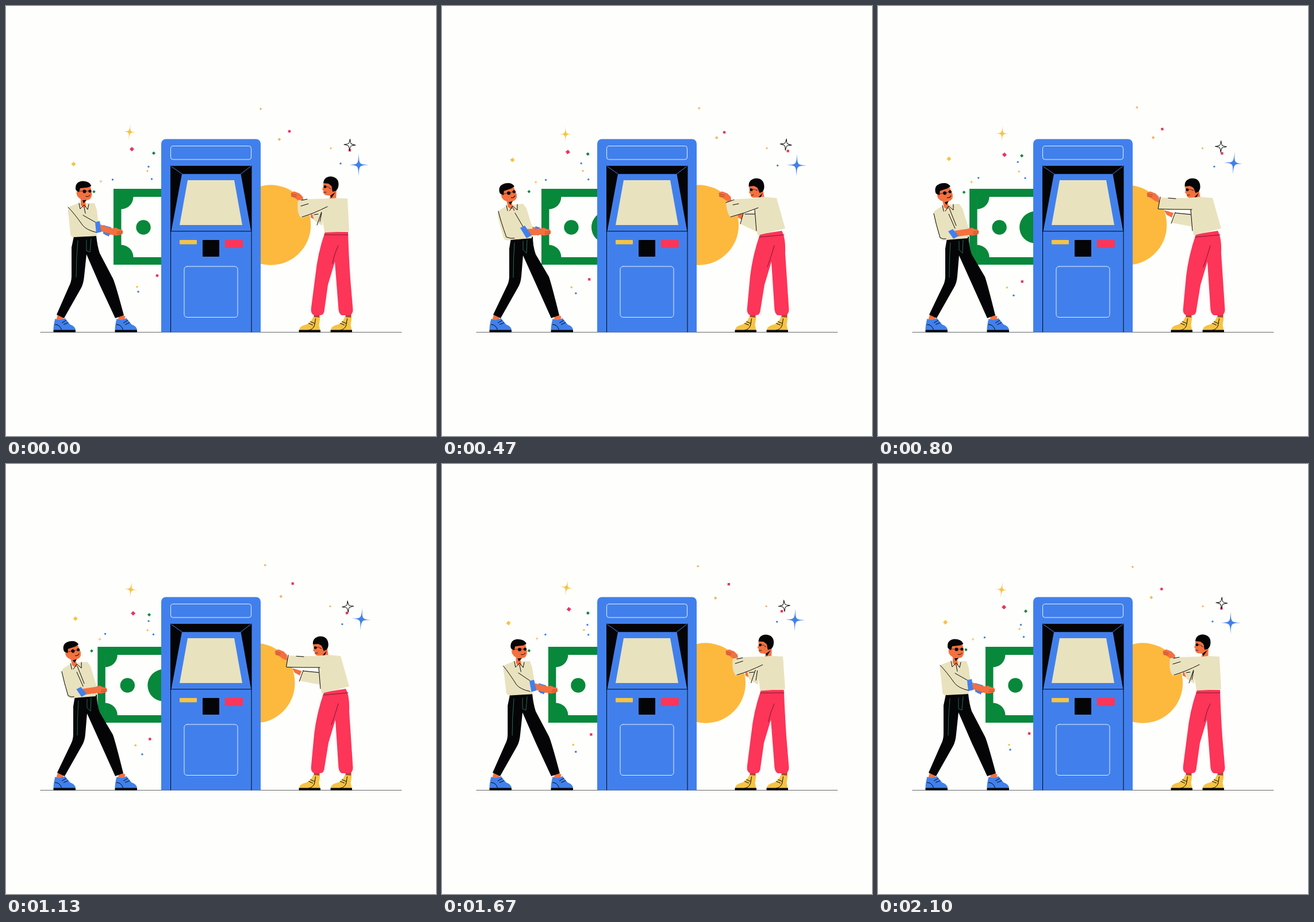
These frames come from a looping animation (748 px wide and 748 px high, 2130 ms). An HTML page with a canvas:

```html
<!DOCTYPE html>
<html lang="en">
<head>
<meta charset="utf-8">
<title>Cash machine exchange</title>
<style>
html, body { margin: 0; width: 100%; height: 100%; overflow: hidden; background: #fefefc; }
canvas { display: block; }
</style>
</head>
<body>
<canvas id="stage" width="748" height="748"></canvas>
<script>
const ctx = document.getElementById('stage').getContext('2d');
const LOOP = 2130, TAU = Math.PI * 2;
const BLUE = '#4180ec', GREEN = '#07883a', GOLD = '#fdb93e', CREAM = '#e9e2be', SKIN = '#f4703f',
      RED = '#fd3558', PINK = '#e8365f', INK = '#050507', YELLOW = '#f6c344', PAPER = '#fefefc';

const fill = (color, d) => { ctx.fillStyle = color; ctx.fill(new Path2D(d)); };
const line = (d, color = INK, w = 1) => {
  ctx.strokeStyle = color; ctx.lineWidth = w; ctx.stroke(new Path2D(d));
};
const disc = (color, x, y, r) => {
  ctx.fillStyle = color; ctx.beginPath(); ctx.arc(x, y, r, 0, TAU); ctx.fill();
};
const box = (color, x, y, w, h, r = 0) => {
  ctx.fillStyle = color; ctx.beginPath(); ctx.roundRect(x, y, w, h, r); ctx.fill();
};
const frame = (x, y, w, h, r) => {
  ctx.strokeStyle = '#e6efff'; ctx.lineWidth = 1;
  ctx.beginPath(); ctx.roundRect(x, y, w, h, r); ctx.stroke();
};
const at = (x, y, deg, draw) => {
  ctx.save(); ctx.translate(x, y); ctx.rotate(deg * Math.PI / 180); draw(); ctx.restore();
};

// 0 -> 1 between a and b, hold, then 1 -> 0 between c and d
const ease = (t, a, b) => (1 - Math.cos(Math.PI * Math.min(1, Math.max(0, (t - a) / (b - a))))) / 2;
const swing = (t, a, b, c, d) => ease(t, a, b) - ease(t, c, d);

// Blend between evenly spaced path poses that share one structure
function pose(k, ...poses) {
  const s = k * (poses.length - 1), i = Math.min(poses.length - 2, Math.floor(s)), f = s - i;
  const next = poses[i + 1].match(/-?[\d.]+/g);
  let n = 0;
  return poses[i].replace(/-?[\d.]+/g, v => +v + (next[n++] - v) * f);
}

// Floating bits: colour, radius, centre x y, cosine sway x y, sine sway x y
const dots = [
  [BLUE, 1.7, 247.5, 276, .5, 3.5, -5.5, -3],
  [BLUE, 1.7, 255, 299, -1.5, 2, 0, 2.5],
  [BLUE, 1.7, 179, 299, 6.5, 3, .5, 3],
  [BLUE, 1.8, 233.5, 501, -3.5, -4, 0, -.5],
  [BLUE, 1.7, 583.5, 276.5, -1.5, -2.5, .5, 1.5],
  [YELLOW, 1.8, 226.5, 489, 1.5, -.5, -1.5, .5]
];
const diamonds = [
  [PINK, 4, 220, 254.5, -1, -5.5, -1, .5],
  [GREEN, 3, 253, 259, 4, -3, 0, -1],
  [GREEN, 2.8, 151, 324, 2, -1, 0, -1],
  [YELLOW, 4, 119.5, 271.5, -2, 3.5, 3.5, -4.5],
  ['#f3b562', 2, 246, 288, 0, -1, -1, -1],
  ['#f3b562', 2.2, 447, 177.5, -4, 1.5, 1, 0],
  ['#f3b562', 2.8, 477, 231, -1.5, 1, 1, -2],
  ['#f3b562', 2, 564.5, 247.5, .5, 0, .5, 0]
];
const squares = [
  [PINK, 3, 256.5, 474, 6.5, -5, -1.5, 2.5],
  [PINK, 3, 495.5, 213.5, -2.5, 4.5, -4, 5.5],
  [PINK, 3, 596, 255, 2, -4, 5.5, -2]
];
const goldStars = [
  [YELLOW, 12, 216, 219, -1, 0, -1, 4],
  ['#f3b562', 4.5, 164, 305, 1, 0, -1, 1.5]
];
const blueStar = [BLUE, 17, 616, 273.5, -2.5, 3, 1.5, 3];
const spark = [PAPER, 10, 596.5, 244.5, 1.5, -3, 1.5, -3];

function floating(t) {
  const a = t / LOOP * TAU, c = Math.cos(a), s = Math.sin(a);
  const put = ([color, r, x, y, cx, cy, sx, sy], deg, draw) =>
    at(x + cx * c + sx * s, y + cy * c + sy * s, deg, () => draw(color, r));
  const square = (color, r) => box(color, -r * .71, -r * .71, r * 1.42, r * 1.42);
  const starPath = (r, h, k = r * .05) =>
    `M0,${-h}C${k},${-k} ${k},${-k} ${r},0C${k},${k} ${k},${k} 0,${h}` +
    `C${-k},${k} ${-k},${k} ${-r},0C${-k},${-k} ${-k},${-k} 0,${-h}Z`;
  const star = (color, r) => fill(color, starPath(r, r * 1.17));
  dots.forEach(b => put(b, 0, (color, r) => disc(color, 0, 0, r)));
  diamonds.forEach(b => put(b, 45 + 8 * s, square));
  squares.forEach(b => put(b, 10 * c, square));
  goldStars.forEach(b => put(b, 6 - 6 * s, star));
  put(blueStar, 3 - 3 * c, star);
  put(spark, 3 * c + 5 * s, (color, r) => {
    fill(color, starPath(r, r, 1.2));
    line(starPath(r, r, 1.2), INK, 1);
  });
}

function bill(x) {
  at(x, 318, 0, () => {
    box(GREEN, 0, 0, 180, 132);
    box(PAPER, 13.5, 14, 150, 105);
    fill(GREEN, 'M13,14H34.5A21.5,21.5 0 0 1 13,35.5ZM13,119H34.5A21.5,21.5 0 0 0 13,97.5Z');
    disc(GREEN, 52, 67, 12.7);
    disc(GREEN, 115, 67, 28);
  });
}

function machine() {
  box(BLUE, 270, 231.5, 173, 336, [8, 8, 0, 0]);
  frame(286.5, 243.5, 140, 23.5, 4);
  fill(INK, 'M286,278H427V391H286Z');
  fill(BLUE, 'M306,292.3H408.5L426.3,391.5H287.5Z');
  line('M286,278L306,292M427,278L408.5,292', BLUE);
  fill(CREAM, 'M316,303H397L411,381H302Z');
  line('M286.5,278V567M427,278V567M286,391.8H427');
  box(YELLOW, 302, 407, 30, 7.5, 1);
  box(INK, 342, 407, 29, 29, 1);
  box(RED, 381, 407, 31, 14, 1);
  frame(310, 453, 93, 88.5, 5);
}

function shoe(x) {
  at(x, 0, 0, () => {
    fill(SKIN, 'M8,535L18,540L16,549L5,546Z');
    fill(BLUE, 'M3,544Q11,549 20,543L29,554Q38,557 38.5,564H0Q0,555 3,544Z');
    line('M15,551L22,547M18,554L25,551M3,554Q11,554 14,563');
    box(INK, 0, 563.5, 38.5, 4, 1);
  });
}

function boot(x) {
  at(x, 0, 0, () => {
    fill('#a84a2e', 'M26,534H36V545H26Z');
    fill(YELLOW, 'M25,541L37,542L35,555L37,564H0Q2,556 13,554Q21,551 25,541Z');
    line('M20,549L27,552M17,552L24,555M29,544L27,556Q24,563 17,564');
    box(INK, 0, 563.5, 37.5, 4, 1);
  });
}

function man(p, q, x) {
  shoe(82.5);
  shoe(189.5);
  // trousers
  fill(INK, pose(q,
    'M118,401L157,400Q159,418 163,430L186,474Q190,482 205,538L190,543L163,485L140,432L136,470Q135,482 131,490L101,543L88,537L109,489Q114,480 114,470L114,420Z',
    'M120,404L158,401Q158,418 163,432L186,471Q190,482 204,538L190,543L164,485L141,434L138,470Q137,482 132,490L102,543L89,537L112,489Q117,480 117,470L117,422Z'));
  line(pose(q, 'M125,408Q122,440 122,472M140,407L140,426L146,428L148,405',
    'M126,412Q124,440 124,472M141,409L141,424L147,430L148,407'), '#2b7a56', .9);
  // far arm
  at(x, 0, 0, () => {
    fill(SKIN, 'M-16,384L0,387L2,397L-14,399Z');
    if (p < .9) fill(BLUE, pose(p, 'M-18,381L-4,385L-8,401L-18,396Z', 'M-3,385L-1,386L-2,398L-5,397Z'));
  });
  // shirt
  fill(CREAM, pose(q,
    'M126,343L110,349Q106,353 109,366L112,396Q112,402 120,402L157,400Q160,392 161,380L158,355L154,343Z',
    'M113,347L99,356Q95,361 100,378L107,403Q109,409 117,407L156,404Q159,395 157,385L147,352L141,344Z'));
  // head
  at(134 - 15 * q, 348 + 3 * q, -12 * q, () => {
    ctx.translate(-134, -348);
    fill(SKIN, 'M126,316L147,314L149.5,327Q149,337 141,337.5L138,340L139,349Q135,353 130,346L130,336Q121,331 123,322Z');
    fill(INK, 'M121,317Q121,305 134,304.5Q146,305 148.5,313L143,315.5L129,317L127,324L124,322Q121,321 121,317Z');
    fill(INK, 'M133,338L140,337.5L135,343Z');
    disc(INK, 136.5, 322.5, 3);
    disc(INK, 146, 322, 2.6);
    line('M128,322L134,322M139,322L144,322', INK, .6);
    line('M139,331Q143,333 146,329');
  });
  line(pose(q, 'M127,343L129,353L136,346L142,354L144,345M136,350L141,377',
    'M112,347L115,360L123,348L131,355L131,345M124,352L136,382'));
  // near arm
  fill(CREAM, pose(p,
    'M110,350L134,358L158,376L158,396L128,388L110,366Z',
    'M98,357L127,356L140,384L149,404L115,407L102,385Z',
    'M98,360L124,356L128,388L132,405L112,408L102,385Z'));
  line(pose(p,
    'M108,350Q119,361 133,381Q140,390 158,394M134,364L157,377',
    'M98,357Q102,374 112,402Q120,405 126,404M127,360L141,384',
    'M97,361Q101,380 108,403Q113,406 118,405M123,362L134,387'));
  fill(SKIN, pose(p, 'M164,380L187,388L189,398L165,392Z',
    'M147,388L173,387L175,398L152,399Z', 'M133,391L160,387L161,398L138,401Z'));
  fill(BLUE, pose(p, 'M155,376L163,374L166,393L157,395Z',
    'M136,386L144,382L156,399L147,404Z', 'M122,392L130,388L140,400L131,405Z'));
  at(x, 0, 0, () => {
    fill(SKIN, 'M-3,388L4,385.5Q10,389 15,389Q17,392 16,396Q10,400 3,399L-3,398Z');
    line('M7,393L16,393M6,396L15,396', '#8f3a24', .7);
  });
}

function woman(p, q, x) {
  boot(509.5);
  boot(564.5);
  // trousers
  fill(RED, pose(q,
    'M555,393L595,393Q596,430 599,475L603.5,528Q604,538 594,538L584,538Q578,535 578,522L572,445L560,485L554,528Q554,538 545,538L536,538Q529,535 531,524L538,470Q542,430 555,393Z',
    'M553,397L591,391Q598,403 597,430L603.5,528Q604,538 594,538L584,538Q578,535 578,522L573,445L561,485L554,528Q554,538 545,538L536,538Q529,535 531,524L536,470Q540,435 553,397Z'));
  line(pose(q, 'M554,398L595,398M578,417Q571,431 568,448', 'M552,402L595,398M578,417Q573,435 566,454'), '#7a1830');
  // far arm
  fill(SKIN, pose(p, 'M530,358L540,360L538,372L530,368Z',
    'M514,360L524,362L522,372L515,368Z', 'M497,355L514,360L511,368L502,363Z'));
  fill(CREAM, pose(p, 'M532,360L552,356L550,382L537,374Z',
    'M524,361L550,357L548,393L519,379Z', 'M517,359L550,361L548,384L510,377Z'));
  line(pose(p, 'M549,358L541,381M536,363L543,362', 'M524,361L519,379M527,362L545,362', 'M517,359L510,378M517,360L546,363'));
  // head
  at(568 - 13 * q, 335 + 2 * q, -12 * q, () => {
    ctx.translate(-568, -335);
    fill(SKIN, 'M552,307L570,307L575,319L574,339L562,338L564,330L556,329Q551,327 552,321L550,319L552,314Z');
    fill(INK, 'M552,308Q553,297 565,296.5Q579,298 578.5,311Q578,319 573,322L568,323L566,313L561,309Z');
    fill(INK, 'M564,330L573,324L566,334Z');
    disc(SKIN, 563.5, 317, 3.4);
    line('M562,316L565,318', INK, .8);
    disc(INK, 555, 314.5, 2.4);
    line('M556,314L561,315', INK, .6);
    line('M553,324L557,324', INK, .8);
  });
  // sweater
  fill(CREAM, pose(q,
    'M548,337L573,334L594,335L597,392L554,394L549,360Z',
    'M547,333L560,332L582,334L597,387L549,399L543,354Z'));
  line(pose(q, 'M549,360L546,375', 'M544,354L547,391'));
  // near arm
  at(x, 0, 0, () => {
    fill(SKIN, 'M35,325L41,322.5L50,326L56,332L57,342L49,339L42,334L36,332Z');
    line('M36,327L45,329M36,330L44,332', '#8f3a24', .7);
  });
  fill(CREAM, pose(p,
    'M508,338L525,336L562,335L566,350L535,361L514,369Q505,362 508,338Z',
    'M494,341L512,336L555,334L560,350L530,358L502,368Q495,360 494,341Z',
    'M491,333L512,334L552,334L553,354L525,354L488,353Q489,345 491,333Z'));
  line(pose(p,
    'M513,348L526,344M515,367Q535,361 559,349M514,338L524,336',
    'M494,342L508,337M502,367Q528,360 550,351M506,346L516,344',
    'M491,332L487,353M488,353Q515,354 546,354M505,334L518,335'));
}

const start = performance.now();
function draw() {
  const t = (performance.now() - start) % LOOP;
  const p = swing(t, 110, 830, 1080, 1800);
  const q = swing(t, 50, 480, 1080, 1800);
  const billX = 187 - 28 * p, coinX = 460.5 - 28 * p;
  ctx.fillStyle = PAPER;
  ctx.fillRect(0, 0, 748, 748);
  ctx.lineCap = ctx.lineJoin = 'round';
  line('M60,567.5H688', '#66686a', 1.2);
  floating(t);
  bill(billX);
  disc(GOLD, coinX, 381, 69.7);
  machine();
  man(p, q, billX);
  woman(p, q, coinX);
  requestAnimationFrame(draw);
}
draw();
</script>
</body>
</html>
```
